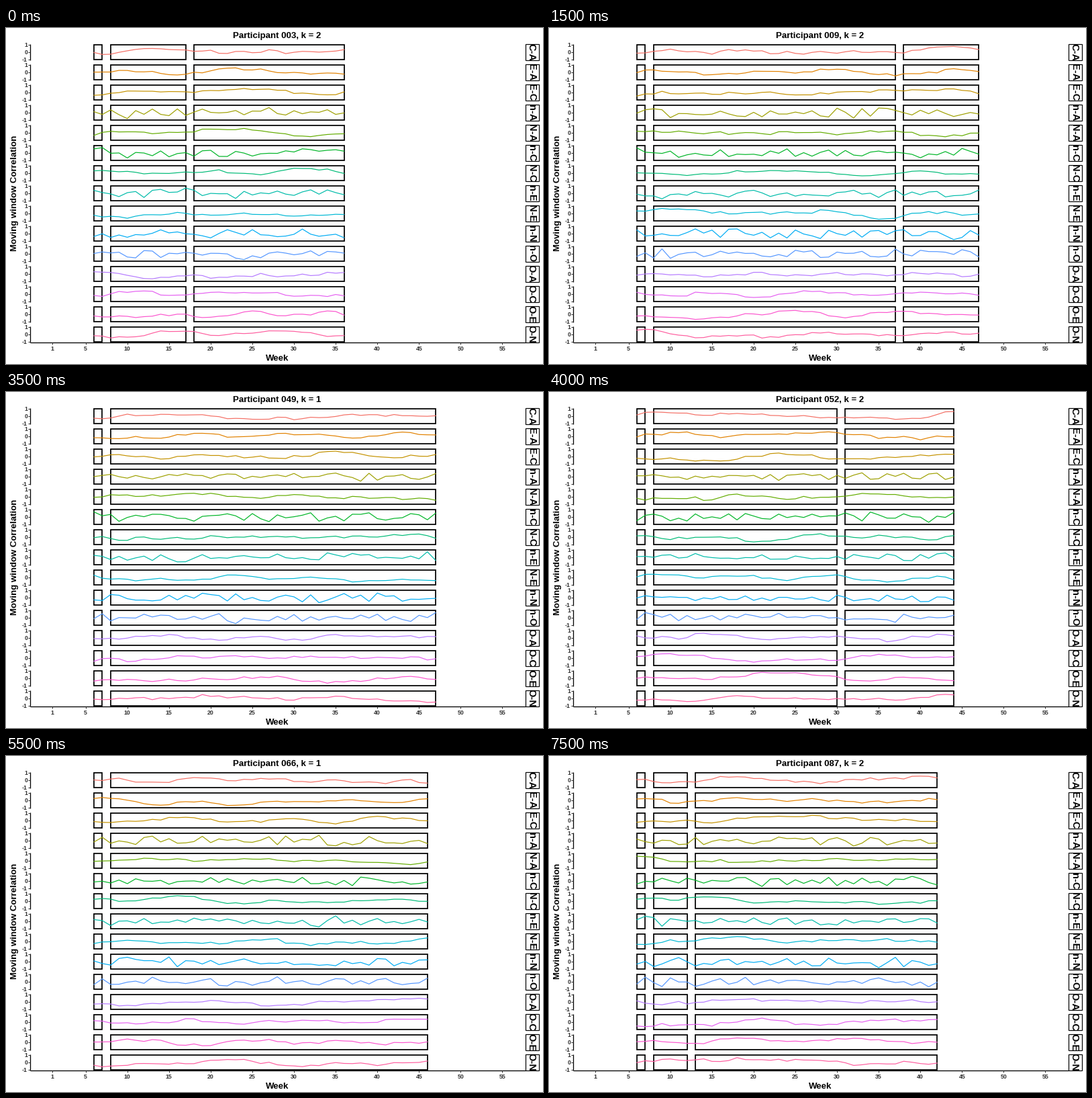
A matplotlib script for the animation above (8000 ms loop, 800 by 500 pixels).

```python
import numpy as np
import matplotlib.pyplot as plt
from matplotlib.animation import FuncAnimation
from matplotlib.collections import PolyCollection
from matplotlib.patches import Rectangle

W, H, DPI = 800, 500, 100
PX = 72 / DPI
INK = "#333333"
NAMES = ["C-A", "E-A", "E-C", "n-A", "N-A", "n-C", "N-C", "n-E",
         "N-E", "n-N", "n-O", "O-A", "O-C", "O-E", "O-N"]

plt.rcParams["font.family"] = "Liberation Sans"
plt.rcParams["font.weight"] = "bold"


def week_x(week):
    return 69 + 12.416 * (np.asarray(week) - 1)


def corr_y(panel, value):
    return 36 + 30 * panel - 11 * np.asarray(value)


def hue(deg, chroma=104, lum=63):
    """Polar CIE-LUV colour as sRGB."""
    h = np.radians(deg)
    y = ((lum + 16) / 116) ** 3
    u = chroma * np.cos(h) / (13 * lum) + 0.19784
    v = chroma * np.sin(h) / (13 * lum) + 0.46834
    x = 9 * y * u / (4 * v)
    z = -x / 3 - 5 * y + 3 * y / v
    lin = np.array([3.2405 * x - 1.5371 * y - 0.4985 * z,
                    -0.9693 * x + 1.8760 * y + 0.0416 * z,
                    0.0556 * x - 0.2040 * y + 1.0572 * z]).clip(0, 1)
    return tuple(np.where(lin > 0.00304, 1.055 * lin ** (1 / 2.4) - 0.055,
                          12.92 * lin))


def correlation(rng, name, weeks, window, locked):
    """Network density pairs (n-) jump freely; trait pairs drift in a window."""
    if name[0] == "n":
        return np.tanh(rng.normal(0, 0.36, weeks.size))
    shocks = 0.55 * rng.standard_t(3, weeks.size + window - 1).clip(-3.5, 3.5)
    row = np.tanh(np.convolve(shocks, np.ones(window) / window, "valid"))
    extreme = -0.97 if "N" in name else 0.97
    ramp = 1 - 0.25 * (weeks == 6)
    return np.where(weeks <= locked, extreme * ramp, row)


def scene(pid, end, cut=None, window=6, locked=0):
    """Title, phase spans and one row of values per panel."""
    rng = np.random.default_rng(int(pid))
    weeks = np.arange(6, end + 1)
    spans = [(6, 7)] + ([(8, cut), (cut + 1, end)] if cut else [(8, end)])
    rows = [correlation(rng, name, weeks, window, locked) for name in NAMES]
    return f"Participant {pid}, k = {len(spans) - 1}", spans, weeks, rows


scenes = [
    scene("003", 36, 17),
    scene("004", 45),
    scene("007", 43, 20),
    scene("009", 47, 37),
    scene("021", 45, 15),
    scene("042", 34),
    scene("046", 46, 24),
    scene("049", 47),
    scene("052", 44, 30),
    scene("057", 43, 12),
    scene("061", 47, 28),
    scene("066", 46),
    scene("074", 42, 22),
    scene("082", 48, window=2, locked=13),
    scene("085", 40),
    scene("087", 42, 12),
]

fig = plt.figure(figsize=(W / DPI, H / DPI), dpi=DPI, facecolor="white")
ax = fig.add_axes([0, 0, 1, 1])
ax.set(xlim=(0, W), ylim=(H, 0))
ax.axis("off")


def rule(x, y, color="black", width=1.3):
    ax.plot(x, y, color=color, lw=width * PX, solid_capstyle="butt")


def label(x, y, text, size, color="black", ha="center", rotation=0):
    return ax.text(x, y, text, fontsize=size * PX, color=color, ha=ha,
                   va="baseline", rotation=rotation, rotation_mode="anchor")


title = label(404, 15, "", 13.2)
label(404, 495, "Week", 13.2)
label(15.8, 246, "Moving window Correlation", 13.2, rotation=90)

rule([35.5, 773.5], [468, 468])
for week in [1, *range(5, 56, 5)]:
    x = week_x(week)
    rule([x, x], [468, 471], INK, 1)
    label(x, 480, str(week), 8.8, INK)

boxes = PolyCollection([], facecolors="none", edgecolors="black",
                       linewidths=1.75 * PX, joinstyle="miter", zorder=2)
ax.add_collection(boxes)

lines = []
for p, name in enumerate(NAMES):
    mid = 36 + 30 * p
    rule([36, 36], [mid - 12, mid + 12])
    for value in (1, 0, -1):
        y = corr_y(p, value)
        rule([33, 36], [y, y], INK, 1)
        label(32, y + 3.4, str(value), 8.8, INK, "right")
    strip = ax.add_patch(Rectangle((773.5, mid - 12), 20.5, 24, fc="white",
                                   ec="black", lw=1.2 * PX))
    tag = label(778.8, mid, name, 14.6, rotation=270)
    tag.set_clip_on(True)
    tag.set_clip_path(strip)
    lines += ax.plot([], [], color=hue(15 + 24 * p), lw=1.2 * PX, zorder=3)


def draw(i):
    text, spans, weeks, rows = scenes[i]
    title.set_text(text)
    verts = []
    for p, (line, row) in enumerate(zip(lines, rows)):
        line.set_data(week_x(weeks), corr_y(p, row))
        top, bottom = corr_y(p, 1), corr_y(p, -1)
        for a, b in spans:
            l, r = week_x(a), week_x(b)
            verts.append([(l, top), (r, top), (r, bottom), (l, bottom)])
    boxes.set_verts(verts)
    return [title, boxes, *lines]


anim = FuncAnimation(fig, draw, frames=len(scenes), interval=500,
                     repeat=True, repeat_delay=0)
plt.show()
```
